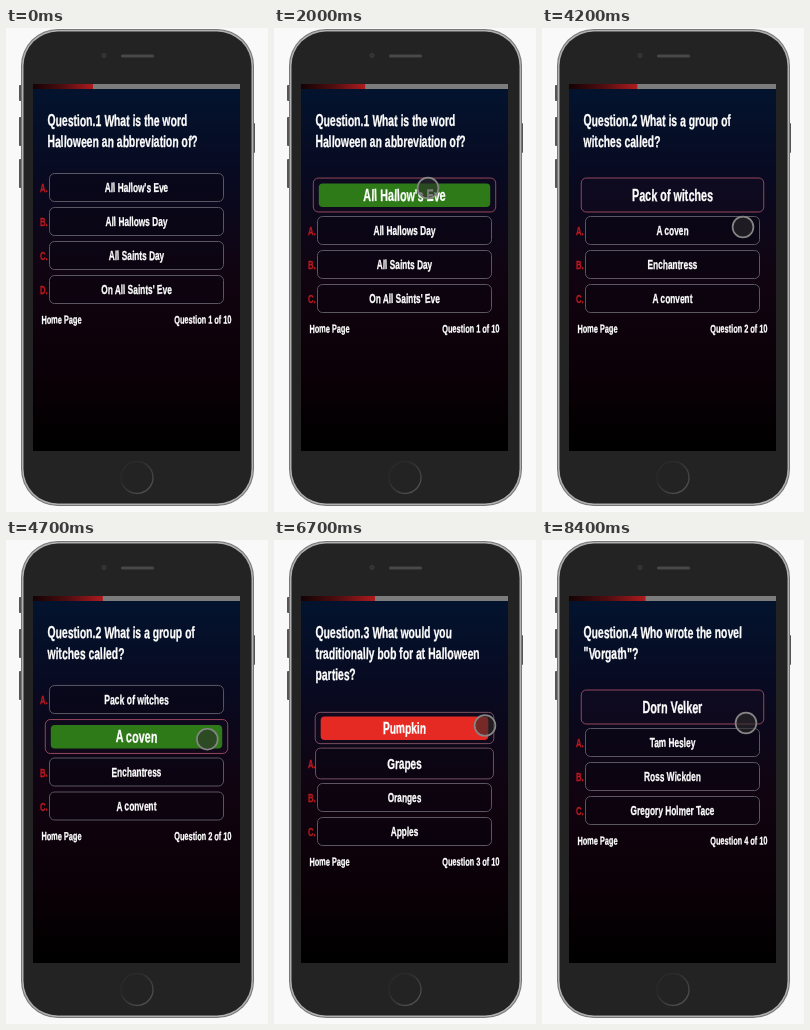
Write an HTML page that moves like this. It is 262x484 px and loops after 8.6 s.

```html
<!DOCTYPE html>
<html lang="en">
<head>
<meta charset="utf-8">
<title>Halloween quiz</title>
<style>
html, body { margin: 0; width: 100%; height: 100%; overflow: hidden; background: #f9f9f9; }
svg { display: block; width: 262px; height: 484px; }
text {
  font-family: "Liberation Sans", Arial, sans-serif; font-weight: bold; white-space: pre;
  fill: #fff; stroke: #fff; stroke-width: .35px;
}
.letter { fill: #b8191f; stroke: #b8191f; }
</style>
</head>
<body>
<svg id="stage" viewBox="0 0 262 484">
  <defs>
    <linearGradient id="night" x2="0" y2="1">
      <stop offset="0" stop-color="#03142f"/>
      <stop offset=".25" stop-color="#080a21"/>
      <stop offset=".52" stop-color="#110411"/>
      <stop offset=".8" stop-color="#0a0006"/>
      <stop offset="1" stop-color="#000"/>
    </linearGradient>
    <linearGradient id="blood">
      <stop offset="0" stop-color="#140204"/>
      <stop offset=".5" stop-color="#500d10"/>
      <stop offset="1" stop-color="#ae1b1e"/>
    </linearGradient>
    <linearGradient id="rim" x2="1" y2="1">
      <stop offset=".3" stop-color="#2a2a2a"/>
      <stop offset="1" stop-color="#5a5a5a"/>
    </linearGradient>
  </defs>
  <g fill="#555">
    <rect x="13" y="57" width="4" height="16" rx="1"/>
    <rect x="13" y="89" width="4" height="29" rx="1"/>
    <rect x="13" y="131" width="4" height="29" rx="1"/>
    <rect x="245" y="95" width="4" height="30" rx="1"/>
  </g>
  <rect x="15" y="1" width="233" height="477" rx="37" fill="#777"/>
  <rect x="16" y="2" width="231" height="475" rx="36" fill="#b0b0b0"/>
  <rect x="17.5" y="3.5" width="228" height="472" rx="34.5" fill="#232323"/>
  <circle cx="98" cy="27.5" r="2" fill="#303033" stroke="#3c3c3c"/>
  <rect x="115" y="26.5" width="33" height="3" rx="1.5" fill="#484848"/>
  <circle cx="131" cy="449.5" r="16" fill="none" stroke="url(#rim)" stroke-width="1.3"/>
  <rect x="27" y="56" width="207" height="367" fill="url(#night)"/>
  <rect x="27" y="56" width="207" height="5" fill="#7c7c7c"/>
  <rect id="bar" x="27" y="56" height="5" fill="url(#blood)"/>
  <g id="quiz"></g>
  <circle id="touch" r="10.4" fill="#2c2c2c" fill-opacity=".6" stroke="#858585" stroke-width="1.7"/>
  <path id="move" stroke="#fff" stroke-width="1.2" stroke-linejoin="round"/>
</svg>
<script>
const LOOP = 8600, LINE = 21, PITCH = 34, HOVER_EXTRA = 4.5, CONDENSE = 0.65;

const questions = [
  { from: 0, lines: ["Question.1 What is the word", "Halloween an abbreviation of?"],
    options: ["All Hallow's Eve", "All Hallows Day", "All Saints Day", "On All Saints' Eve"] },
  { from: 2500, lines: ["Question.2 What is a group of", "witches called?"],
    options: ["Pack of witches", "A coven", "Enchantress", "A convent"] },
  { from: 5200, lines: ["Question.3 What would you", "traditionally bob for at Halloween", "parties?"],
    options: ["Pumpkin", "Grapes", "Oranges", "Apples"] },
  { from: 7400, lines: ["Question.4 Who wrote the novel", "\"Vorgath\"?"],
    options: ["Dorn Velker", "Tam Hesley", "Ross Wickden", "Gregory Holmer Tace"] }
];

const GREEN = "#2e7a18", RED = "#e42a22";
const taps = [
  { at: 1700, option: 0, color: GREEN },
  { at: 4400, option: 1, color: GREEN },
  { at: 6600, option: 0, color: RED }
];

// time, x, y
const cursorPath = [
  [100, 243, 289], [900, 153, 161], [1100, 153, 161], [2000, 154, 160], [2700, 154, 160],
  [3900, 201, 199], [4400, 201, 199], [5600, 203, 200], [6300, 211, 185.5], [8000, 211, 185.5], [8400, 204, 183]
];

const byId = id => document.getElementById(id);
const clamp = v => Math.max(0, Math.min(1, v));
const easeOut = p => 1 - Math.pow(1 - clamp(p), 2.3);
const smooth = p => { p = clamp(p); return p * p * (3 - 2 * p); };
const latest = (list, t, key) => list.filter(item => item[key] <= t).pop();
const mixColor = (a, b, p) => `rgb(${a.map((v, i) => Math.round(v + (b[i] - v) * p))})`;

function set(el, attrs) {
  for (const name in attrs) el.setAttribute(name, attrs[name]);
  return el;
}

function add(tag, attrs = {}) {
  const el = document.createElementNS("http://www.w3.org/2000/svg", tag);
  byId("quiz").append(set(el, attrs));
  return el;
}

// slight letter tilt gives the wobbly, hand-cut lettering
const tilt = Array.from({ length: 36 }, (_, i) => (3 * Math.sin(i * 2.4)).toFixed(1)).join(" ");
const addText = (anchor = "start", cls = "") =>
  add("text", { "text-anchor": anchor, class: cls, rotate: tilt });

function write(el, content, x, y, size) {
  if (el.textContent !== content) el.textContent = content;
  set(el, { transform: `translate(${x} ${y}) scale(${CONDENSE} 1)`, "font-size": size });
}

const title = [0, 1, 2].map(() => addText());
const rows = [0, 1, 2, 3].map(() => ({
  box: add("rect", { rx: 5 }),
  fill: add("rect", { rx: 4 }),
  letter: addText("start", "letter"),
  label: addText("middle")
}));
const home = addText();
const count = addText("end");

const arm = "L1 -1L1 -4.5L3.5 -4.5L0 -8L-3.5 -4.5L-1 -4.5L-1 -1";
const turn = (path, quarter) => path.replace(/(-?[\d.]+) (-?[\d.]+)/g, (_, x, y) => {
  for (let i = 0; i < quarter; i++) [x, y] = [-y, +x];
  return `${x} ${y}`;
});
// arms run counter-clockwise so the outline stays a single shape
set(byId("move"), { d: "M1 -1" + [0, 3, 2, 1].map(q => turn(arm, q)).join("") + "Z" });

function hoverAmount(t, option) {
  return taps.reduce((amount, tap) => {
    const target = tap.option === option ? 1 : 0;
    return amount + (target - amount) * easeOut((t - tap.at) / 350);
  }, 0);
}

function cursorAt(t) {
  const i = cursorPath.findIndex(k => k[0] > t);
  if (i < 0) return cursorPath[cursorPath.length - 1].slice(1);
  if (i === 0) return cursorPath[0].slice(1);
  const [a, b] = [cursorPath[i - 1], cursorPath[i]];
  const p = smooth((t - a[0]) / (b[0] - a[0]));
  return [a[1] + (b[1] - a[1]) * p, a[2] + (b[2] - a[2]) * p];
}

function drawOptions(question, tap, t) {
  const hovered = tap ? tap.option : -1;
  const answered = tap && tap.at >= question.from;
  let y = 145.5 + LINE * (question.lines.length - 2) + (hovered === 0 ? HOVER_EXTRA : 0);
  let marker = 0;

  rows.forEach((row, i) => {
    const active = i === hovered;
    const grow = hoverAmount(t, i);
    const width = 174 + 8.5 * grow;
    const height = 28 + 6 * grow;
    const middle = y + (active ? 17 : 14);
    const size = 12.8 + 3.8 * Math.sqrt(grow);

    set(row.box, {
      x: 130.5 - width / 2, y: middle - height / 2, width, height,
      fill: active ? "#180c20" : "#08040f", "fill-opacity": 0.35,
      stroke: mixColor([90, 87, 98], [150, 70, 90], grow)
    });
    set(row.fill, {
      x: 130.5 - width / 2 + 5.5, y: middle - 11.5, width: width - 11, height: 23.5,
      fill: active && answered ? tap.color : "none"
    });
    write(row.label, question.options[i], 130.5, middle + size * 0.36, size);
    write(row.letter, active ? "" : "ABCD"[marker++] + ".", 34, middle + 4.5, 11.8);
    y += PITCH + (active ? HOVER_EXTRA : 0);
  });
  return y;
}

function draw(t) {
  const question = latest(questions, t, "from");
  const tap = latest(taps, t, "at");

  const second = Math.floor((t + 500) / 1000);
  const ticks = t < 500 ? 0 : second - 1 + easeOut((t + 500 - second * 1000) / 450);
  set(byId("bar"), { width: 2.07 * (29 + ticks) });

  title.forEach((el, i) => write(el, question.lines[i] || "", 41.5, 98 + LINE * i, 16));
  const end = drawOptions(question, tap, t);
  write(home, "Home Page", 35.5, end + 14, 11.3);
  write(count, `Question ${questions.indexOf(question) + 1} of 10`, 225.5, end + 14, 11.3);

  const place = `translate(${cursorAt(t).join(" ")})`;
  set(byId("move"), { transform: place, visibility: t >= 100 && t < 1100 ? "visible" : "hidden" });
  set(byId("touch"), { transform: place, visibility: t >= 1100 ? "visible" : "hidden" });
}

function frame() {
  draw(performance.now() % LOOP);
  requestAnimationFrame(frame);
}
frame();
</script>
</body>
</html>
```
